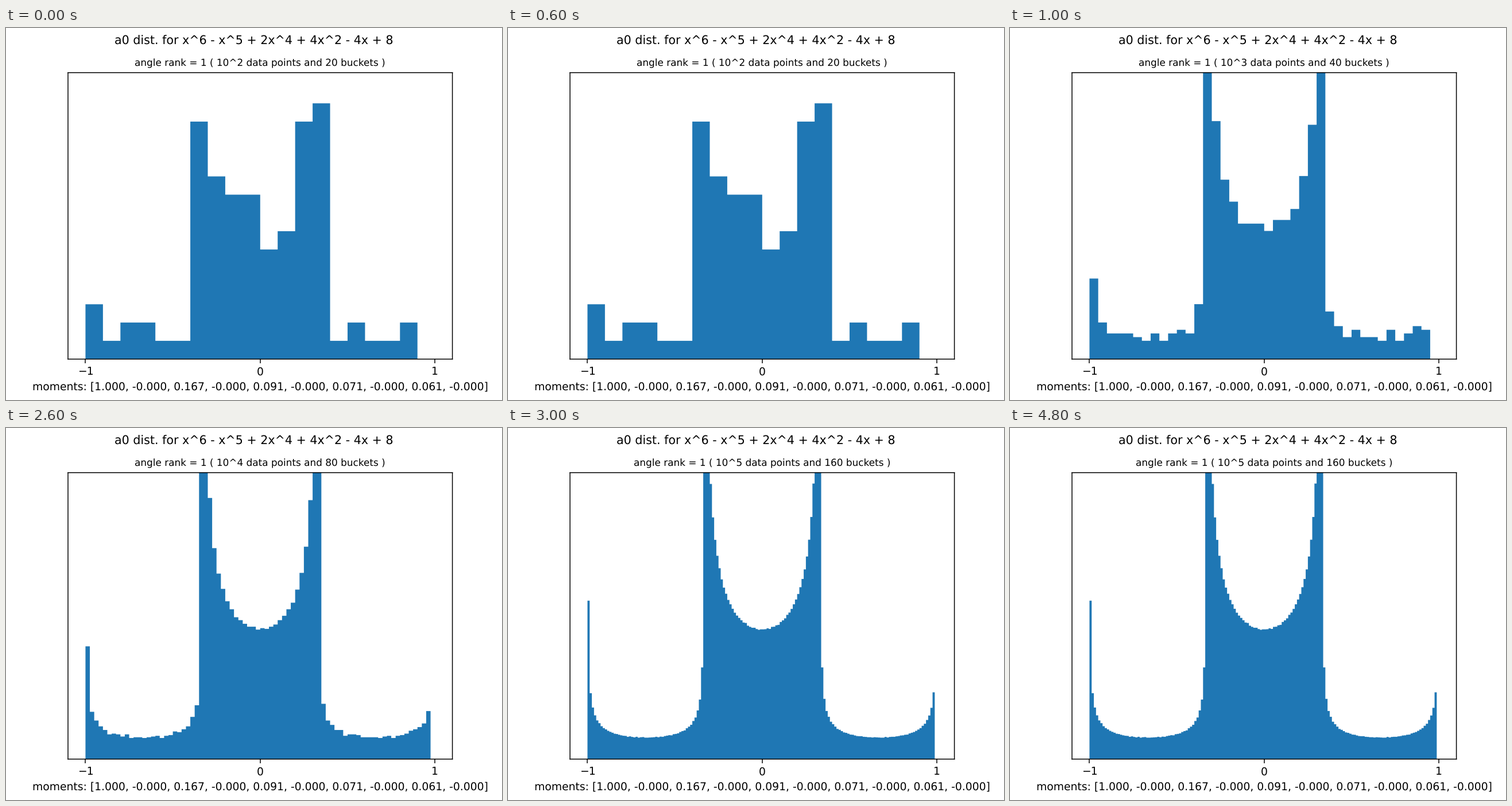
Recreate the animation shown at these times as a matplotlib script. Size 864 by 648 pixels, loop 6 s.

```python
import numpy as np
import matplotlib.pyplot as plt
from matplotlib.animation import FuncAnimation

DPI = 135
COEFFICIENTS = [1, -1, 2, 0, 4, -4, 8]
ANGLES = np.angle(np.roots(COEFFICIENTS))

plt.rcParams.update({
    "font.family": "DejaVu Sans",
    "text.hinting": "none",
    "path.snap": False,
})


def normalized_traces(count):
    """Mean of the n-th powers of the roots scaled to the unit circle."""
    n = np.arange(1, count + 1)
    return np.mean([np.cos(n * angle) for angle in ANGLES], axis=0)


def histogram(points, buckets):
    # The half-open range leaves the last bucket out.
    edges = np.arange(buckets) * 2 / buckets - 1
    return np.histogram(normalized_traces(points), edges, density=True)


fig, ax = plt.subplots(figsize=(864 / DPI, 648 / DPI), dpi=DPI)
fig.suptitle("a0 dist. for x^6 - x^5 + 2x^4 + 4x^2 - 4x + 8", fontsize=11)
title = ax.set_title("", fontsize=9)
ax.set_xlabel("moments: [1.000, -0.000, 0.167, -0.000, 0.091, "
              "-0.000, 0.071, -0.000, 0.061, -0.000]", fontsize=10)
bars = ax.stairs(*histogram(100, 20), fill=True, color="C0")
ax.set(xlim=(-1.1, 1.1), ylim=(0, 1.6), xticks=[-1, 0, 1], yticks=[])
ax.set_xticklabels(["\u22121", "0", "1"])


def update(second):
    stage = min(second, 3)
    power, buckets = stage + 2, 20 * 2 ** stage
    bars.set_data(*histogram(10 ** power, buckets))
    title.set_text(f"angle rank = 1 ( 10^{power} data points "
                   f"and {buckets} buckets )")
    return bars, title


anim = FuncAnimation(fig, update, frames=6, interval=1000, repeat=True)
plt.show()
```
